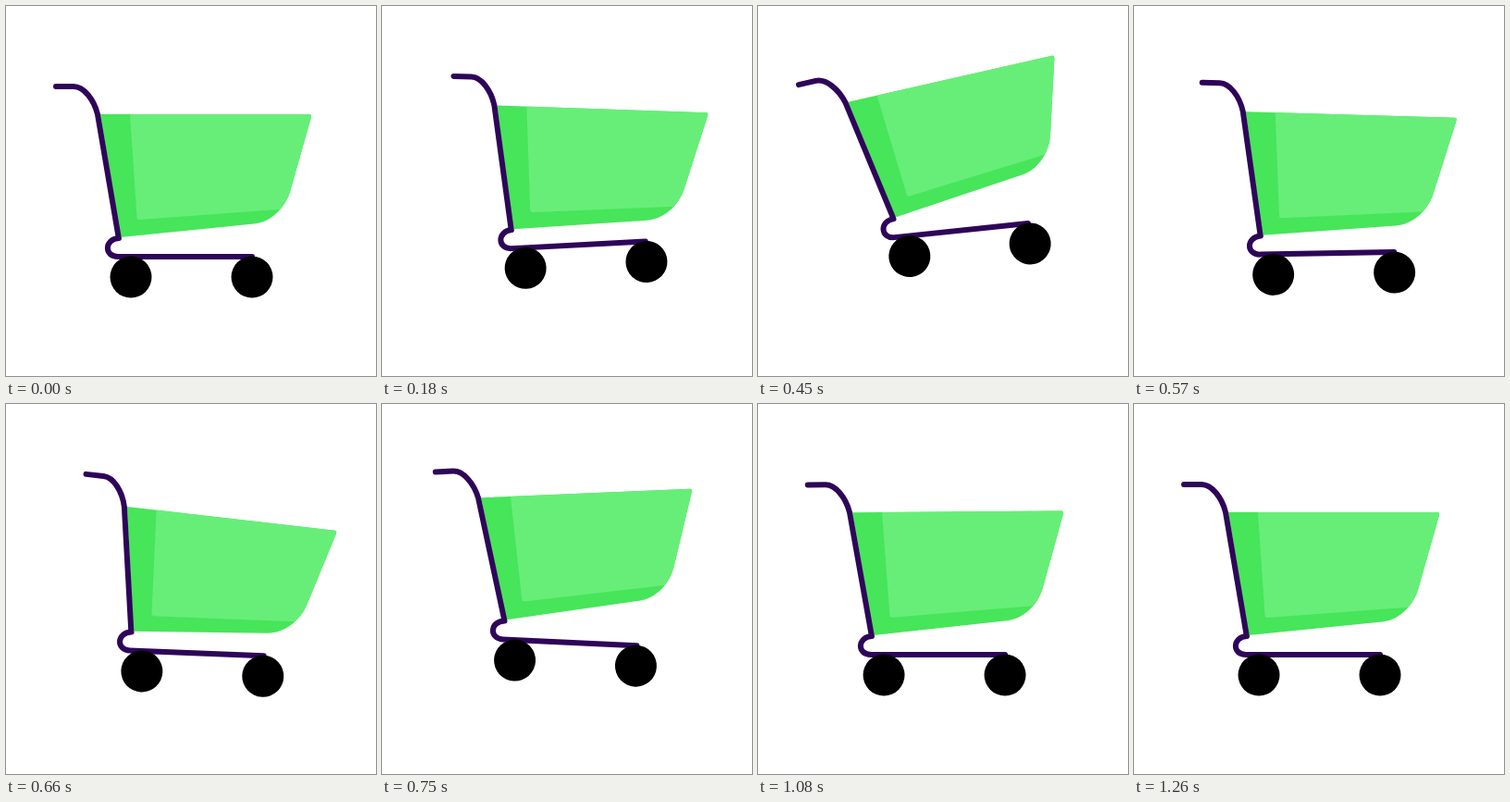
These frames come from a looping animation (400 px wide and 400 px high, 3290 ms). An HTML page with a canvas:

```html
<!DOCTYPE html>
<html lang="en">
<head>
<meta charset="utf-8">
<title>Hopping cart</title>
<style>
  html, body { margin: 0; width: 100%; height: 100%; overflow: hidden; background: #fff; }
  canvas { display: block; width: 100vmin; height: 100vmin; }
</style>
</head>
<body>
<canvas id="stage" width="400" height="400"></canvas>
<script>
const ctx = document.getElementById('stage').getContext('2d');
const LOOP = 3290, STEP = 30, END = 1260;
const INK = '#2e0559', LIGHT = '#67ee78', DARK = '#47e55a';

const AXLE = { x: 135, y: 293 };   // rear wheel, chassis pivot
const JOINT = { x: 121, y: 250 };  // basket pivot on the chassis

const handle = new Path2D('M54 87H73C84 87 95 101 99 117L121.5 249');
const frame = new Path2D('M122 251C106 252 106 271 121 271H266');
const basket = new Path2D('M102 117H328Q330.5 117 330 120L307 201C301 220 285 234 268 235.5L124 250Z');
const front = new Path2D('M133.5 110H340V216.5L144 231Q142 231 141.6 229Z');

const wave = u => (1 - Math.cos(Math.PI * u)) / 2;
const sineOut = u => Math.sin(Math.PI / 2 * u);
const quadOut = u => u * (2 - u);

// Eases from rest at 0 through [end time, value, easing] legs, then holds.
function track(...legs) {
  return t => {
    let start = 0, from = 0;
    for (const [end, to, ease = wave] of legs) {
      if (t < end) return from + (to - from) * ease((t - start) / (end - start));
      start = end;
      from = to;
    }
    return from;
  };
}

const drift = track([400, 31, sineOut], [620, 13.5], [END, 0, quadOut]);
const hop = track([415, -24.3], [612, 0], [755, -16], [990, 0]);
const tilt = track([390, -6.8], [710, 2.9], [930, 0]);
const swing = track([120, 3.6], [420, -13.7], [645, 6.8], [795, -4.8],
  [965, 2.4], [1100, -0.6], [END, 0]);

function turn(p, deg) {
  ctx.translate(p.x, p.y);
  ctx.rotate(deg * Math.PI / 180);
  ctx.translate(-p.x, -p.y);
}

function fill(path, color) {
  ctx.fillStyle = color;
  ctx.fill(path);
}

function wheel(x) {
  const disc = new Path2D();
  disc.arc(x, AXLE.y, 22.5, 0, 2 * Math.PI);
  fill(disc, '#000');
}

function drawBasket() {
  ctx.save();
  fill(basket, DARK);
  ctx.clip(basket);
  fill(front, LIGHT);
  ctx.restore();
  ctx.stroke(handle);
}

function draw(t) {
  const lean = tilt(t);
  ctx.clearRect(0, 0, 400, 400);
  ctx.strokeStyle = INK;
  ctx.lineWidth = 6;
  ctx.lineCap = ctx.lineJoin = 'round';

  ctx.save();
  ctx.translate(drift(t), hop(t));
  turn(AXLE, lean);
  ctx.stroke(frame);
  wheel(AXLE.x);
  wheel(266);
  turn(JOINT, swing(t) - lean);
  drawBasket();
  ctx.restore();
}

function tick() {
  const t = performance.now() % LOOP;
  draw(Math.min(END, Math.floor(t / STEP) * STEP));
  requestAnimationFrame(tick);
}
tick();
</script>
</body>
</html>
```
